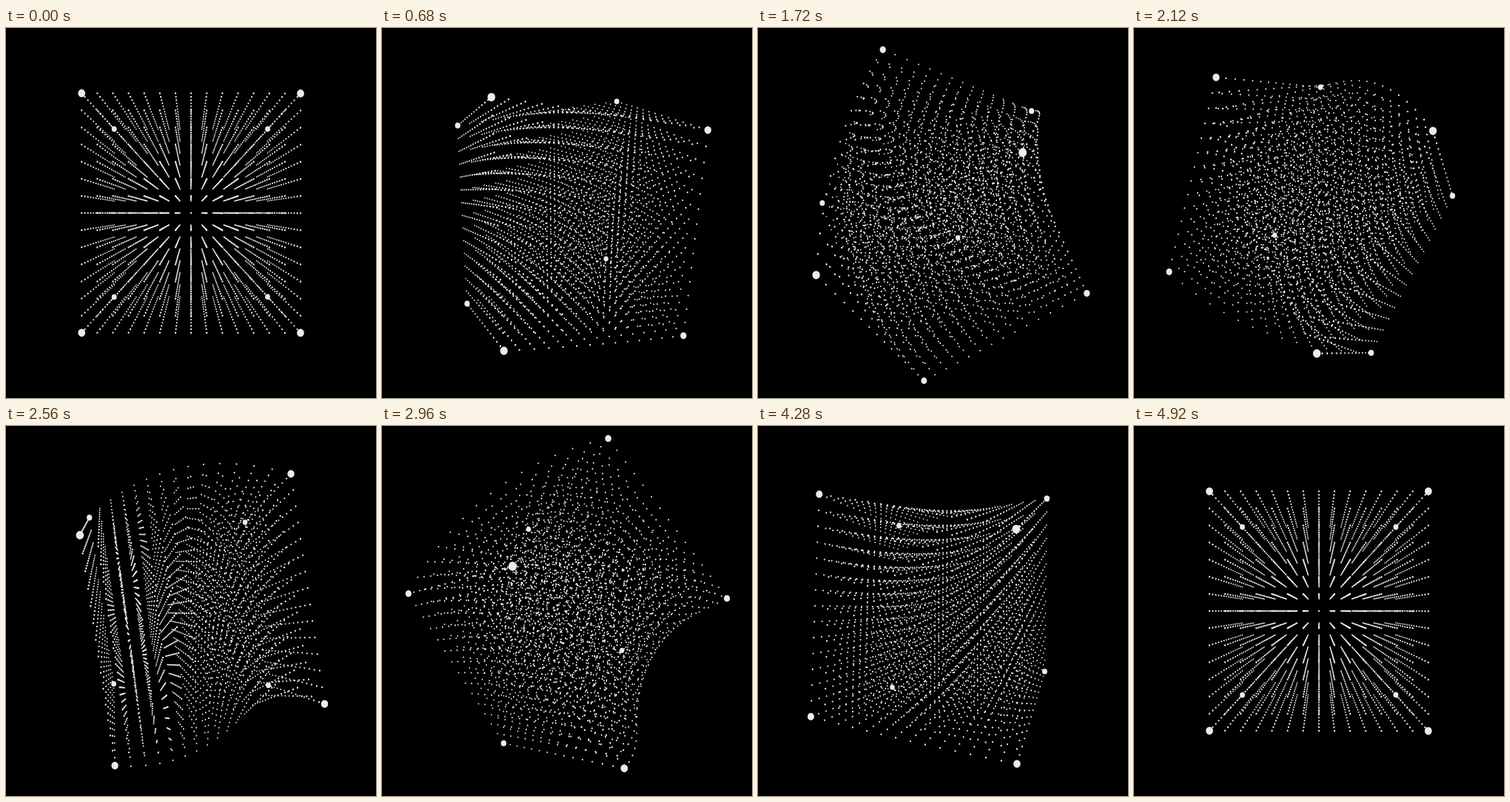
An HTML page with a canvas that plays this animation: 500x500 px, repeating every 5000 ms.

```html
<!DOCTYPE html>
<html>
<head>
<meta charset="utf-8">
<style>
  html, body { margin: 0; height: 100%; overflow: hidden; background: #000; }
  canvas { display: block; }
</style>
</head>
<body>
<canvas id="stage" width="500" height="500"></canvas>
<script>
const ctx = document.getElementById('stage').getContext('2d');
const SIDE = 15, FRAME = 40, FRAMES = 125;
const DISTANCE = 5.69, FOCAL = 758.8, SQUEEZE = 0.914;
const TILT = 51, TILT_PEAK = 62 / FRAMES;
const TWIST = 37.3, TWIST_PEAK = 70 / FRAMES;
const rad = deg => deg * Math.PI / 180;
const smooth = x => x * x * (3 - 2 * x);

// Cubic Bezier easing with flat ends and handles at x = a and x = b
function ease(x, a, b) {
  let low = 0, high = 1;
  for (let i = 0; i < 24; i++) {
    const u = (low + high) / 2, v = 1 - u;
    if (3 * a * u * v * v + 3 * b * u * u * v + u * u * u < x) low = u;
    else high = u;
  }
  return smooth(low);
}

// Rises from 0 to 1 at the peak, then falls back to 0
const swell = (p, peak, rise) =>
  p < peak ? rise(p / peak) : smooth((1 - p) / (1 - peak));

const points = [];
const coord = i => 2 * i / (SIDE - 1) - 1;
for (let i = 0; i < SIDE; i++)
  for (let j = 0; j < SIDE; j++)
    for (let k = 0; k < SIDE; k++) {
      const [x, y, z] = [i, j, k].map(coord);
      const corner = Math.abs(x * y * z) === 1;
      points.push({ x, y, z, radius: corner ? 0.033 : 0.0078 });
    }

function rotate(a, b, angle) {
  const c = Math.cos(angle), s = Math.sin(angle);
  return [a * c - b * s, a * s + b * c];
}

function draw(p) {
  const spin = rad(360 * smooth(p));
  const tilt = rad(TILT * swell(p, TILT_PEAK, smooth));
  const twist = rad(TWIST * swell(p, TWIST_PEAK, x => ease(x, 0.26, 0.65)));

  ctx.setTransform(1, 0, 0, 1, 0, 0);
  ctx.fillStyle = '#000';
  ctx.fillRect(0, 0, 500, 500);
  ctx.setTransform(SQUEEZE, 0, 0, 1, 250, 250);
  ctx.fillStyle = '#ebebeb';
  ctx.beginPath();
  for (const point of points) {
    let { x, y, z } = point;
    [y, z] = rotate(y, z, twist * x);
    [z, x] = rotate(z, x, spin);
    [y, z] = rotate(y, z, tilt);
    const scale = FOCAL / (DISTANCE - z), r = point.radius * scale;
    ctx.moveTo(x * scale + r, -y * scale);
    ctx.arc(x * scale, -y * scale, r, 0, 2 * Math.PI);
  }
  ctx.fill();
}

const start = performance.now();
function tick() {
  const time = (performance.now() - start) % (FRAME * FRAMES);
  draw(Math.min(Math.floor(time / FRAME) + 1, FRAMES - 1) / FRAMES);
  requestAnimationFrame(tick);
}
tick();
</script>
</body>
</html>
```
